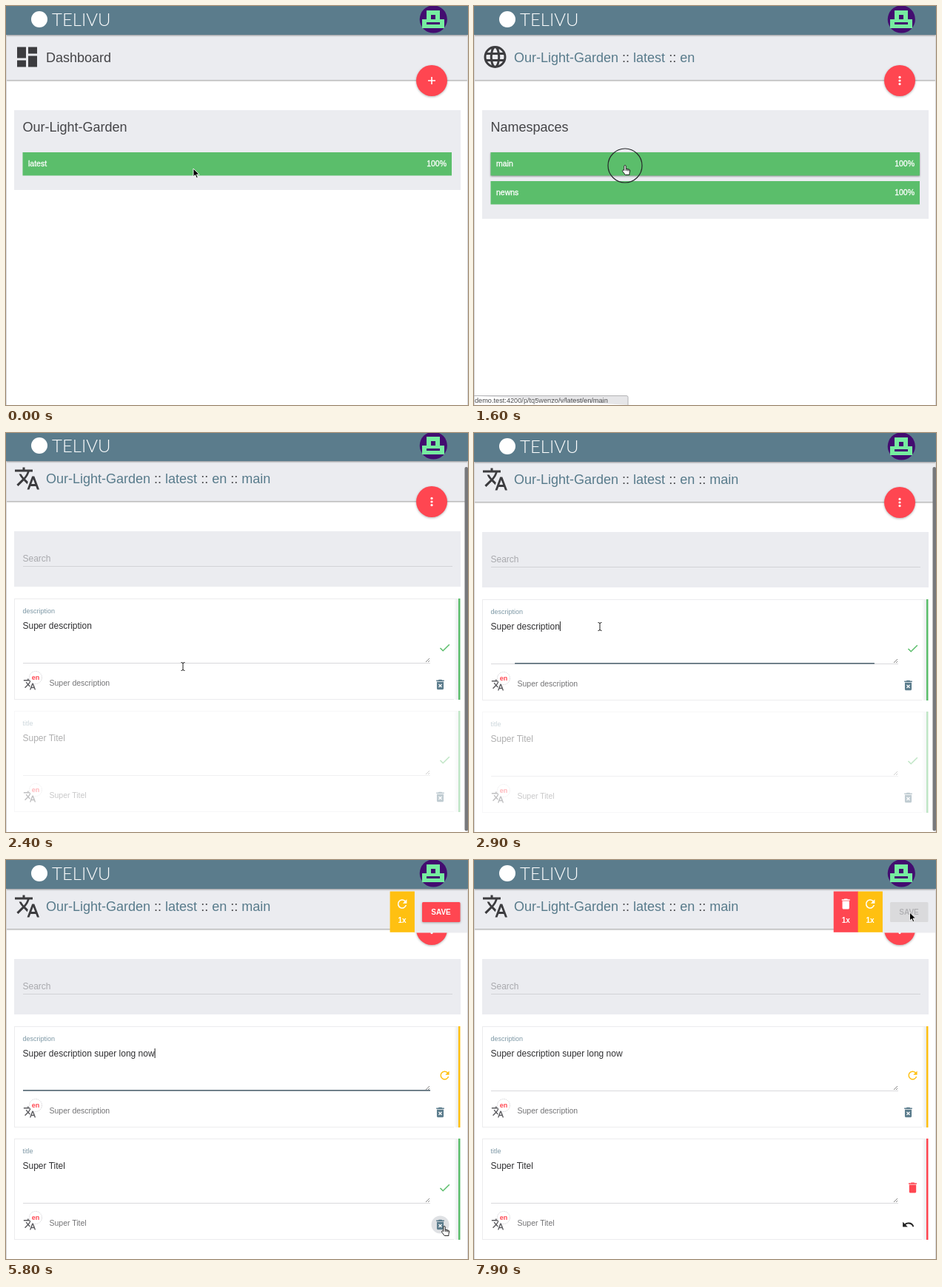
Animation, 624 px wide and 540 px high, one loop 8000 ms. Source, as an HTML page:

```html
<!DOCTYPE html>
<html lang="en">
<head>
<meta charset="utf-8">
<title>Translation dashboard</title>
<style>
  html, body { margin: 0; width: 100%; height: 100%; overflow: hidden; background: #fff; }
  svg { display: block; width: 624px; height: 540px; font-family: "Liberation Sans", Arial, sans-serif; }
  text { white-space: pre; }
  .h { font-size: 18px; fill: #444447; }
  .link { fill: #587b8b; }
  .bar { font-size: 10.5px; fill: #fff; stroke: #fff; stroke-width: .3px; }
  .label { font-size: 9px; fill: #7d98a5; }
  .body { font-size: 12px; fill: #2f2f31; }
  .small { font-size: 10.5px; fill: #747476; }
  .badge { font: bold 9px "Liberation Sans", Arial, sans-serif; fill: #ff4651; text-anchor: middle; }
  .count { font: bold 10px "Liberation Sans", Arial, sans-serif; fill: #fff; text-anchor: middle; }
  .brand { font: 300 24px Lato, "Open Sans", sans-serif; fill: #fff; }
  .lift { filter: drop-shadow(0 1px 1.5px rgba(0,0,0,.3)); }
  .edge { filter: drop-shadow(0 1px 1px rgba(0,0,0,.4)); }
</style>
</head>
<body>
<svg id="svg" viewBox="0 0 624 540"></svg>
<script>
const LOOP = 8000;
const GREY = '#ebecf0', TEAL = '#5b7c8c', GREEN = '#5bbe6b', RED = '#ff4651', AMBER = '#ffc011', DARK = '#3c3c3f';
const PROJECT = 'Our-Light-Garden';
const ADDRESS = 'demo.test:4200/p/tq5wenzo/v/latest';
const BASE_TEXT = 'Super description', ADDED_TEXT = ' super long now';
const TYPE_START = 3050, KEY_TIME = 110;

const ICONS = {
  dashboard: 'M3 13h8V3H3zM3 21h8v-6H3zM13 21h8V11h-8zM13 3v6h8V3z',
  apps: [4, 10, 16].map(x => [4, 10, 16].map(y => `M${x} ${y}h4v4h-4z`).join('')).join(''),
  translate: 'M12.87 15.07l-2.54-2.51.03-.03c1.74-1.94 2.98-4.17 3.71-6.53H17V4h-7V2H8v2H1v2h11.17C11.5 7.92 10.44 9.75 9 11.35 8.07 10.32 7.3 9.19 6.69 8h-2c.73 1.63 1.73 3.17 2.98 4.56l-5.09 5.02L4 19l5-5 3.11 3.11zM18.5 10h-2L12 22h2l1.12-3h4.75L21 22h2zm-2.62 7l1.62-4.33L19.12 17z',
  check: 'M9 16.2L4.8 12l-1.4 1.4L9 19 21 7l-1.4-1.4z',
  refresh: 'M17.65 6.35A8 8 0 1 0 19.73 14h-2.08A6 6 0 1 1 16.22 7.78L13 11h7V4z',
  trash: 'M6 19c0 1.1.9 2 2 2h8c1.1 0 2-.9 2-2V7H6zM19 4h-3.5l-1-1h-5l-1 1H5v2h14z',
  undo: 'M12.5 8c-2.65 0-5.05 1-6.9 2.6L2 7v9h9l-3.62-3.62a8 8 0 0 1 12.72 3.62l2.37-.78A10.5 10.5 0 0 0 12.5 8z'
};

const rect = (x, y, w, h, fill, more = '') =>
  `<rect x="${x}" y="${y}" width="${w}" height="${h}" fill="${fill}" ${more}/>`;
const circle = (x, y, r, fill, more = '') =>
  `<circle cx="${x}" cy="${y}" r="${r}" fill="${fill}" ${more}/>`;
const text = (x, y, cls, s, more = '') => `<text x="${x}" y="${y}" class="${cls}" ${more}>${s}</text>`;
const line = (d, stroke, w = 1, more = '') =>
  `<path d="${d}" fill="none" stroke="${stroke}" stroke-width="${w}" ${more}/>`;
const group = (id, s, more = '') => `<g id="${id}" ${more}>${s}</g>`;
const place = (x, y, k) => `transform="translate(${x} ${y}) scale(${k}) translate(-12 -12)"`;
const icon = (name, x, y, k, fill) => `<path d="${ICONS[name]}" ${place(x, y, k)} fill="${fill}"/>`;

const globe = `<g ${place(28.5, 69, 1.5)}>` +
  line('M3 12a9 9 0 1 0 18 0a9 9 0 1 0-18 0M8.5 12a3.5 9 0 1 0 7 0a3.5 9 0 1 0-7 0M4 9h16M4 15h16', DARK, 2) + '</g>';

const trail = parts => parts.map(p => `<tspan class="link">${p}</tspan>`).join(' :: ');

const FAB_Y = 101;
const fab = plus => '<g class="lift">' + circle(575, FAB_Y, 21, RED) + '</g>' + (plus
  ? line(`M570 ${FAB_Y}h10M575 ${FAB_Y - 5}v10`, '#fff', 1.6)
  : [-4.6, 0, 4.6].map(d => circle(575, FAB_Y + d, 1.6, '#fff')).join(''));

const page = (id, mark, title, body, plus) => group(id,
  '<g class="edge">' + rect(0, 30, 624, 70, GREY) + '</g>' + mark + text(54, 76, 'h', title) + body + fab(plus));

const bar = (y, label, id = '') =>
  rect(22.5, y, 579.5, 31.5, GREEN, `id="${id}"`) +
  text(30, y + 19, 'bar', label) + text(595, y + 19, 'bar', '100%', 'text-anchor="end"');

const listing = (title, h, bars) => rect(11, 141, 603, h, GREY) + text(22.5, 169.5, 'h', title) + bars;

// Entry card: y is the top edge, everything else hangs off it.
const entry = (id, y, label, value) => {
  const trashX = 586.5, trashY = y + 116.5;
  return group(id,
    rect(11.5, y + .5, 601, 136, '#fff', 'stroke="#ececee"') +
    rect(605, y + 1, 6, 136, 'url(#soft)') +
    rect(611, y, 2.5, 137, GREEN, `id="${id}Edge"`) +
    text(22.5, y + 20, 'label', label) + text(22.5, y + 41, 'body', value, `id="${id}Text"`) +
    line(`M23 ${y + 87.5}H573`, '#d9d9dc') +
    line(`M567 ${y + 86}l5-5M570 ${y + 86}l2-2`, '#777', .9) +
    group(id + 'Ok', icon('check', 592.5, y + 66.5, .76, GREEN)) +
    group(id + 'Dirty', icon('refresh', 592.5, y + 66.5, .76, AMBER)) +
    group(id + 'Gone', icon('trash', 592.5, y + 66.5, .78, RED)) +
    icon('translate', 32, y + 116, .74, '#5c5c60') +
    circle(40, y + 107, 8.5, '#fff', 'stroke="#d5d5d8" stroke-dasharray="1.5 1"') +
    text(40, y + 110, 'badge', 'en') +
    text(58.5, y + 118, 'small', value) +
    group(id + 'Trash',
      circle(trashX, trashY, 12, '#dfe1e4', `id="${id}Hover"`) +
      icon('trash', trashX, trashY, .76, TEAL) +
      line(`M${trashX - 2} ${trashY - .5}l4 4m0-4l-4 4`, '#fff', 1.3)) +
    group(id + 'Undo', icon('undo', trashX, trashY, .74, '#222')));
};

const editor =
  rect(11, 141, 603, 75, GREY) + text(22.5, 182, 'body', 'Search', 'style="fill:#a8a9ad"') +
  line('M23 188.5H603', '#d2d3d7') +
  entry('desc', 232, 'description', BASE_TEXT) + entry('title', 384, 'title', 'Super Titel') +
  rect(23, 318, 550, 1.6, '#586c78', 'id="focus"') + rect(0, 262, 1, 13, '#222', 'id="caret"');

const counter = (id, x, name, fill) => group(id,
  rect(x, 42.5, 33.3, 55.3, fill) + icon(name, x + 16.5, 59.5, .78, '#fff') + text(x + 16.5, 85, 'count', '1x'));

const panel = group('panel',
  rect(551, 40, 73, 58.5, GREY) + counter('gone', 485.7, 'trash', RED) + counter('changed', 518.6, 'refresh', AMBER) +
  rect(562, 57, 51.5, 27, RED, 'id="save" rx="1.5"') + text(587.5, 74, 'count', 'SAVE', 'id="saveLabel"'));

const avatar = circle(577.3, 18, 18.6, '#430c70') +
  [[568, 6, 18, 6], [568, 12, 6, 7], [580, 12, 6, 7], [568, 18, 18, 4], [562, 18, 6, 12], [586, 18, 6, 12], [562, 25, 30, 5]]
    .map(r => rect(...r, '#76eda0')).join('');

const header = '<g class="edge">' + rect(0, -5, 624, 44, TEAL) + '</g>' +
  circle(45, 18, 11, '#fff') + text(62, 27, 'brand', 'TELIVU') + avatar;

const cursor = group('cursor',
  circle(0, 0, 23, 'none', 'id="ring" stroke="#26262a" stroke-width="1.2"') +
  `<path id="arrow" d="M0 0v11l2.6-2.3 1.7 4 1.9-.8-1.7-3.9h3.6z" fill="#000" stroke="#fff" stroke-width=".9"/>` +
  `<path id="hand" d="M-1.2 6.5V.8a1.2 1.2 0 0 1 2.4 0V4.2l4.2 1a1.7 1.7 0 0 1 1.3 1.9l-.8 3.2V12.5H.3L-3.3 7.8a1 1 0 0 1 1.5-1.4zM1.2 4.2v3M3.2 4.8v2.6M5 5.2v2.4" fill="#fff" stroke="#111" stroke-width=".9"/>` +
  line('M-2.5-5.5q2.5 0 2.5 1.5V4q0 1.5-2.5 1.5M2.5-5.5Q0-5.5 0-4M2.5 5.5Q0 5.5 0 4', '#222', 1, 'id="beam"'));

document.getElementById('svg').innerHTML =
  `<defs><linearGradient id="soft"><stop stop-color="#fff"/><stop offset="1" stop-color="#e8eaec"/></linearGradient></defs>` +
  group('stage',
    page('home', icon('dashboard', 28.5, 69, 1.5, DARK), 'Dashboard',
      listing(PROJECT, 108, bar(198, 'latest', 'homeBar')), true) +
    page('version', icon('apps', 28.5, 69, 1.5, DARK), trail([PROJECT, 'latest']),
      listing('Overview', 108, bar(198, 'en', 'versionBar'))) +
    page('language', globe, trail([PROJECT, 'latest', 'en']),
      listing('Namespaces', 147, bar(198, 'main', 'languageBar') + bar(237, 'newns'))) +
    page('names', icon('translate', 28.5, 69.5, 1.5, DARK), trail([PROJECT, 'latest', 'en', 'main']), editor) +
    panel + header) +
  line('M.5 40V540M623.5 40V540', '#d6d6d8') +
  rect(619.5, 46, 4.5, 492.5, '#77787b', 'id="scrollbar" rx="2"') +
  group('status', line('M0 527.5H206q2 0 2 2V540', '#b4b4b6', 1, 'style="fill:#e6e6e8"') +
    text(1, 537, '', '', 'id="address" font-size="9.2" fill="#4a4a4c"')) +
  cursor;

const el = {};
document.querySelectorAll('[id]').forEach(e => el[e.id] = e);
const show = (id, on) => { el[id].style.display = on ? '' : 'none'; };
const set = (id, name, value) => el[id].setAttribute(name, value);
const ramp = (t, a, b) => {
  const u = Math.min(1, Math.max(0, (t - a) / (b - a)));
  return u * u * (3 - 2 * u);
};
const within = (t, a, b) => t >= a && t < b;
// Latest entry of [[start, value], ...] at time t.
const pick = (t, steps) => steps.filter(s => s[0] <= t).pop()[1];

const PAGES = [[0, 'home'], [430, 'version'], [1100, 'language'], [1800, 'names']];
const PATHS = [[0, ''], [150, ADDRESS], [600, ADDRESS + '/en'], [1250, ADDRESS + '/en/main'], [1880, '']];
const POINTERS = [[0, 'arrow'], [120, 'hand'], [1800, 'arrow'], [2150, 'beam'], [TYPE_START, ''], [4800, 'beam'],
  [5100, 'arrow'], [5580, 'hand'], [6550, 'arrow'], [7250, 'hand'], [7780, 'arrow']];
const CLICKS = [330, 1000, 1580, 2720, 6100, 7650];
const MOVES = [[0, 253, 220], [300, 271, 210], [850, 271, 210], [1400, 204, 216], [1800, 204, 216], [2300, 239, 316],
  [2480, 239, 316], [2680, 170, 262], [4800, 170, 262], [5650, 592, 496], [6500, 592, 496], [7400, 588.5, 71], [LOOP, 588.5, 71]];

function drawPointer(t) {
  const i = MOVES.findIndex(m => m[0] > t);
  const [t0, x0, y0] = MOVES[i - 1], [t1, x1, y1] = MOVES[i];
  const u = ramp(t, t0, t1);
  set('cursor', 'transform', `translate(${x0 + (x1 - x0) * u} ${y0 + (y1 - y0) * u})`);
  const shape = pick(t, POINTERS);
  ['arrow', 'hand', 'beam'].forEach(s => show(s, s === shape));
  show('ring', CLICKS.some(c => Math.abs(t - c) < 90));
}

function drawEditor(t) {
  const typed = Math.max(0, Math.min(ADDED_TEXT.length, Math.floor((t - TYPE_START) / KEY_TIME) + 1));
  const lastKey = typed ? TYPE_START + (typed - 1) * KEY_TIME : 2720;
  const dirty = typed > 0, gone = t >= 6200, saved = t >= 7780, focused = within(t, 2720, 6100);

  el.descText.textContent = BASE_TEXT + ADDED_TEXT.slice(0, typed);
  show('caret', focused && (t - lastKey) % 1000 < 500);
  if (focused) set('caret', 'x', 22.5 + el.descText.getComputedTextLength());
  const wide = 550 * ramp(t, 2720, 2950) * (1 - ramp(t, 6100, 6300));
  set('focus', 'x', 298 - wide / 2);
  set('focus', 'width', wide);

  set('descEdge', 'fill', dirty ? AMBER : GREEN);
  set('titleEdge', 'fill', gone ? RED : GREEN);
  show('descOk', !dirty);
  show('descDirty', dirty);
  ['descGone', 'descUndo', 'descHover', 'titleDirty'].forEach(id => show(id, false));
  show('titleOk', !gone);
  ['titleGone', 'titleUndo', 'gone'].forEach(id => show(id, gone));
  show('titleTrash', !gone);
  show('titleHover', t >= 5600);
  el.title.style.opacity = 1 - .62 * (ramp(t, 2180, 2360) - ramp(t, 5150, 5350));

  show('panel', dirty);
  set('panel', 'transform', `translate(${105 * (1 - ramp(t, TYPE_START, 3250))} 0)`);
  set('save', 'fill', saved ? '#dadadc' : RED);
  set('save', 'class', saved ? '' : 'lift');
  el.saveLabel.style.fill = saved ? '#b2b2b5' : '#fff';
}

function draw(t) {
  const current = pick(t, PAGES);
  PAGES.forEach(([, id]) => show(id, id === current));
  ['homeBar', 'versionBar', 'languageBar'].forEach(id => set(id, 'class', t > 120 ? 'edge' : ''));

  const path = pick(t, PATHS);
  show('status', path);
  el.address.textContent = path;

  // The short scroll overshoots by one pixel before settling.
  set('names', 'transform', `translate(0 ${-7 * ramp(t, 2100, 2300)})`);
  set('stage', 'transform', `translate(0 ${ramp(t, 2550, 2700) - ramp(t, 2280, 2360)})`);
  el.scrollbar.style.opacity = ramp(t, 2080, 2160) - ramp(t, 2900, 3150);

  drawEditor(t);
  drawPointer(t);
}

const start = performance.now();
function tick() {
  draw((performance.now() - start) % LOOP);
  requestAnimationFrame(tick);
}
tick();
</script>
</body>
</html>
```
